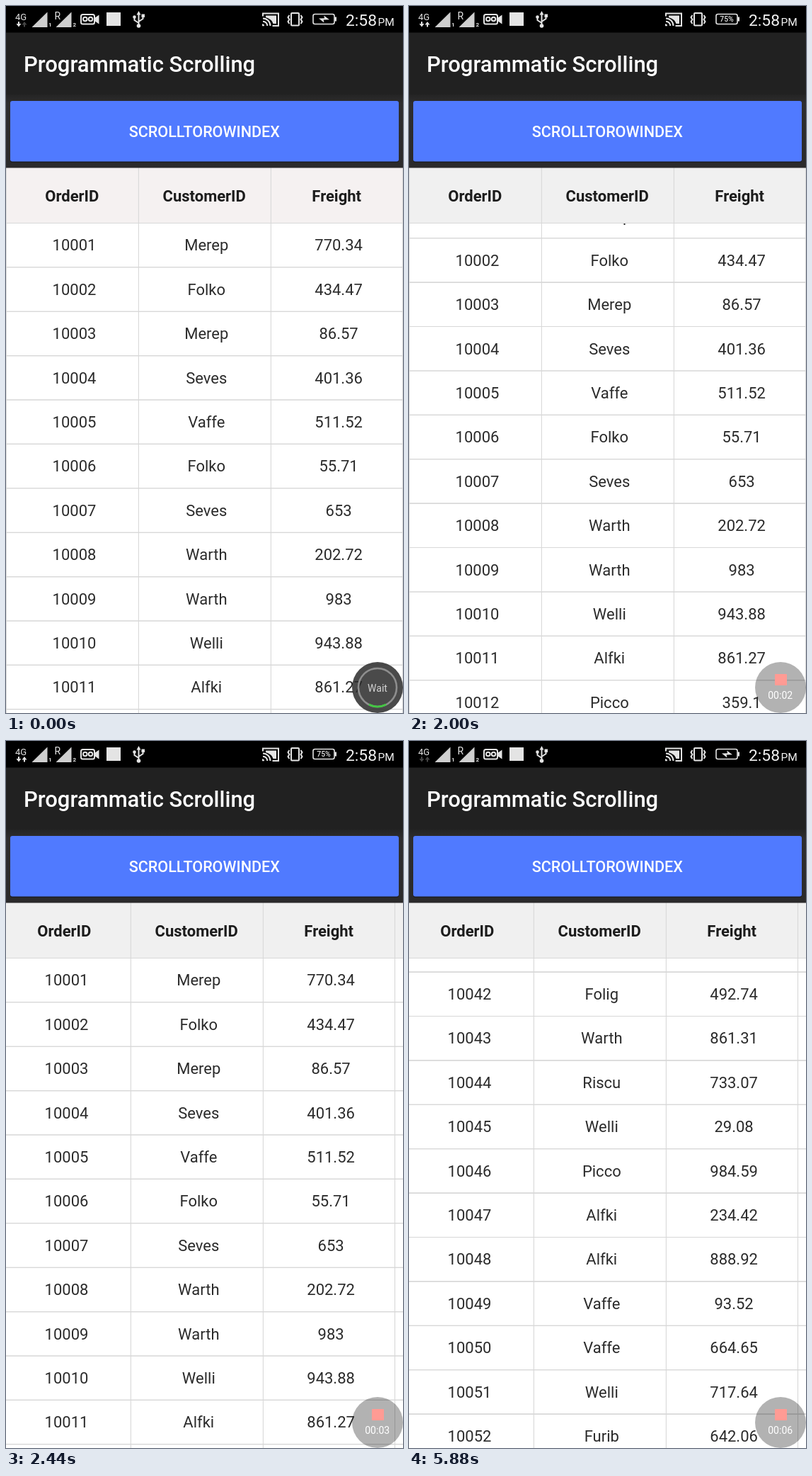
Write an HTML page that moves like this. It is 561 px wide and 998 px high and loops after 5.92 s.

```html
<!DOCTYPE html>
<html lang="en">
<head>
<meta charset="utf-8">
<title>Programmatic Scrolling</title>
<style>
  html, body { margin: 0; width: 100%; height: 100%; overflow: hidden; background: #fff; }
  svg { display: block; width: 100vw; height: 100vh; font-family: Roboto, "Noto Sans", sans-serif; }
  .mid { text-anchor: middle; }
  .row { font-size: 22px; fill: #2b2b2b; }
  .head { font-size: 22px; font-weight: 700; fill: #1c1c1c; }
  .line { stroke: #d8d8d8; stroke-width: 1.1; }
  .icon { fill: #e4e4e4; }
  .stroke { fill: none; stroke: #e4e4e4; stroke-width: 2; }
</style>
</head>
<body>
<svg viewBox="0 0 561 998" preserveAspectRatio="none">
  <defs>
    <clipPath id="bodyClip"><rect y="306" width="561" height="692"/></clipPath>
    <clipPath id="headClip"><rect y="228" width="561" height="79"/></clipPath>
    <linearGradient id="shade" x2="0" y2="1">
      <stop offset="0" stop-color="#242424"/>
      <stop offset=".12" stop-color="#2e2d2e"/>
      <stop offset="1" stop-color="#2b2a2b"/>
    </linearGradient>
  </defs>
  <rect width="561" height="998" fill="#fff"/>
  <g clip-path="url(#bodyClip)"><g id="rows"></g></g>
  <g clip-path="url(#headClip)">
    <rect id="headBg" y="228" width="561" height="78.5"/>
    <g id="head"></g>
    <path class="line" d="M0 306.5H561"/>
  </g>

  <rect width="561" height="38" fill="#000"/>
  <rect y="37.5" width="561" height="88" fill="#212121"/>
  <rect y="125" width="561" height="103.5" fill="url(#shade)"/>
  <text x="25" y="93" font-size="31" font-weight="500" fill="#fff">Programmatic Scrolling</text>
  <rect x="6" y="136" width="549" height="85" rx="3" fill="#1c1c1e"/>
  <rect id="button" x="6" y="134" width="549" height="85.5" rx="3"/>
  <text class="mid" x="280.3" y="185.3" font-size="21.6" font-weight="500" fill="#fff">SCROLLTOROWINDEX</text>

  <g class="icon">
    <text x="13" y="19.5" font-size="13">4G</text>
    <path id="down" d="M17 22h2v3h2.5L18 29.5 14.5 25H17z"/>
    <path id="up" d="M25 29.500h2v-3h2.500L26 22 22.500 26.500H25z"/>
    <path d="M36.500 30H58.500V8.500zM70.500 30H92.500V8.500z" fill="#cfcfcf"/>
    <text x="60" y="29" font-size="8" font-weight="700">1</text>
    <text x="94.500" y="29" font-size="8" font-weight="700">2</text>
    <text x="68.500" y="18.500" font-size="14" stroke="#000" stroke-width="3" paint-order="stroke">R</text>
    <path d="M125 17l6.500-4.500v13L125 21z"/>
    <rect x="106" y="12" width="19" height="13.500" rx="2.500" class="stroke"/>
    <circle cx="111.800" cy="18.500" r="2.800" class="stroke"/>
    <circle cx="119.500" cy="18.500" r="2.800" class="stroke"/>
    <rect x="142" y="9" width="20" height="19"/>
    <path class="stroke" d="M187.500 10V28M187.500 24l-6-4v-4M187.500 22l6-4v-4"/>
    <path d="M184.500 12.500L187.500 7l3 5.500zM191.500 11.500h4.500v4.500h-4.500z"/>
    <circle cx="181.500" cy="15.500" r="2.300"/><circle cx="187.500" cy="28" r="2.800"/>

    <path class="stroke" d="M363 14.500V10.500H385V28H376.500M363 17.500a10.500 10.500 0 0 1 10.500 10.500M363 21.700a6.300 6.300 0 0 1 6.300 6.300"/>
    <path d="M362 25.200a3 3 0 0 1 3 3h-3zM367 13.500h15V25h-4.500q-2-6.500-10.500-9z"/>
    <rect x="403" y="10" width="11" height="17.500" rx="1" class="stroke"/>
    <path class="stroke" stroke-width="1.500" d="M400.500 13l-2 3 2 3-2 3 2 3M416.500 13l2 3-2 3 2 3-2 3"/>
    <rect x="434" y="11.500" width="30" height="14" rx="2.500" class="stroke" style="stroke-width:1.600"/>
    <path d="M464.500 15.500h2.500v6h-2.500z"/>
    <path id="bolt" d="M442 17.500l8-.3-.8-3.700 7.800 5.800-8.300.3.800 4z"/>
    <text id="percent" class="mid" x="449" y="22.300" font-size="10.500" font-weight="500">75%</text>
    <text x="480" y="27.500" font-size="22.800" fill="#f0f0f0">2:58</text>
    <text x="525.500" y="27.500" font-size="15.500" fill="#f0f0f0">PM</text>
  </g>

  <g id="wait">
    <circle cx="525" cy="962" r="36" fill="#282828" fill-opacity=".84"/>
    <circle cx="525" cy="962" r="27" fill="none" stroke="#8e8e8e" stroke-width="2.600"/>
    <path id="arc" fill="none" stroke="#43c743" stroke-width="2.800"/>
    <text class="mid" x="525" y="967.500" font-size="14" fill="#d2d2d2">Wait</text>
  </g>
  <g id="rec">
    <circle cx="525" cy="962" r="36" fill="#000" fill-opacity=".3"/>
    <rect x="517" y="943" width="17" height="16" rx="1" fill="#ff9b94"/>
    <text id="timer" class="mid" x="524.700" y="977.700" font-size="14" fill="#fff"></text>
  </g>
</svg>
<script>
const LOOP = 5920, PITCH = 62.4, TOP = 306.4, COL = 187;
const $ = id => document.getElementById(id);
const NS = "http://www.w3.org/2000/svg";

function add(parent, tag, attrs, text) {
  const el = document.createElementNS(NS, tag);
  for (const k in attrs) el.setAttribute(k, attrs[k]);
  if (text !== undefined) el.textContent = text;
  parent.appendChild(el);
  return el;
}

const first = `Merep 770.34,Folko 434.47,Merep 86.57,Seves 401.36,Vaffe 511.52,Folko 55.71,
Seves 653,Warth 202.72,Warth 983,Welli 943.88,Alfki 861.27,Picco 359.1`.split(",");
const last = `Folig 492.74,Warth 861.31,Riscu 733.07,Welli 29.08,Picco 984.59,Alfki 234.42,
Alfki 888.92,Vaffe 93.52,Vaffe 664.65,Welli 717.64,Furib 642.06,Seves 318.45`.split(",");
const ids = ["Merep", "Folko", "Seves", "Vaffe", "Warth", "Welli", "Alfki", "Picco", "Folig", "Riscu", "Furib"];

let seed = 29;
const rand = () => (seed = seed * 16807 % 2147483647) / 2147483647;
const filler = Array.from({ length: 29 }, () =>
  ids[Math.floor(rand() * ids.length)] + " " + (20 + rand() * 970).toFixed(2));
const data = [...first, ...filler, ...last].map(s => s.trim().split(" "));

const rowEls = data.map(([id, freight], i) => {
  const y = TOP + i * PITCH, g = add($("rows"), "g", {});
  add(g, "path", { class: "line", d: `M0 ${y}H580M0 ${y + PITCH}H580` });
  [10001 + i, id, freight].forEach((s, c) =>
    add(g, "text", { class: "row mid", x: 96.5 + c * 186.8, y: y + 39 }, s));
  return g;
});
const bottom = TOP + data.length * PITCH;
for (let c = 0; c < 4; c++) {
  const x = c === 3 ? 560.5 : c * COL + .4;
  add($("rows"), "path", { class: "line", d: `M${x} ${TOP}V${bottom}` });
  add($("head"), "path", { class: "line", d: `M${x} 228V306` });
}
["OrderID", "CustomerID", "Freight"].forEach((s, c) =>
  add($("head"), "text", { class: "head mid", x: [93.3, 280.2, 467.2][c], y: 276 }, s));

// Linear interpolation through [time, value] points
function track(points, t) {
  let [t0, v0] = points[0];
  for (const [t1, v1] of points) {
    if (t < t1) return t <= t0 ? v0 : v0 + (v1 - v0) * (t - t0) / (t1 - t0);
    [t0, v0] = [t1, v1];
  }
  return v0;
}
// Last value whose start time has passed
const held = (steps, t) => steps.filter(s => s[0] <= t).pop()[1];

const dragY = [[1560, 0], [1800, -20.5], [1920, -36], [2000, -41.2], [2080, -30], [2280, 15.6], [2440, 0]];
const dragX = [[2040, 0], [2200, -11.6], [2280, -11.6], [2440, -11]];
const clock = [[0, 0], [840, 1], [1640, 2], [2440, 3], [3960, 4], [5440, 5], [5840, 6]];
const charge = [[0, 1], [960, 0], [2480, 1], [5000, 0], [5440, 1]];
const arrows = [[0, [1, .3]], [400, [1, 1]], [3160, [.3, .3]]];

function jump(t) {
  const p = Math.min(1, Math.max(0, (t - 3680) / 840));
  return -(41 * PITCH - 19.7) * (1 - Math.cos(Math.PI * p)) / 2;
}
const show = (id, on) => $(id).setAttribute("visibility", on ? "visible" : "hidden");

function draw(t) {
  const dx = track(dragX, t), dy = track(dragY, t) + jump(t);
  $("rows").setAttribute("transform", `translate(${dx} ${dy})`);
  $("head").setAttribute("transform", `translate(${dx} 0)`);
  rowEls.forEach((g, i) => {
    const y = TOP + i * PITCH + dy;
    g.style.display = y > 230 && y < 1000 ? "" : "none";
  });
  $("headBg").setAttribute("fill", t < 320 ? "#f5f1f1" : "#f0f0f0");
  $("button").setAttribute("fill", t >= 2520 && t < 5440 ? "#537eff" : "#507aff");

  const waiting = t < 400;
  show("wait", waiting);
  show("rec", !waiting);
  const a = .46 + t / 400 * 2.5, sx = 27 * Math.sin(a), cy = 962 + 27 * Math.cos(a);
  $("arc").setAttribute("d", `M${525 + sx} ${cy}A27 27 0 ${a > Math.PI / 2 ? 1 : 0} 1 ${525 - sx} ${cy}`);
  $("timer").textContent = "00:0" + held(clock, t);

  const bolt = held(charge, t), [down, up] = held(arrows, t);
  show("bolt", bolt);
  show("percent", !bolt);
  $("down").setAttribute("opacity", down);
  $("up").setAttribute("opacity", up);
}

const start = performance.now();
function tick() {
  draw((performance.now() - start) % LOOP);
  requestAnimationFrame(tick);
}
tick();
</script>
</body>
</html>
```
